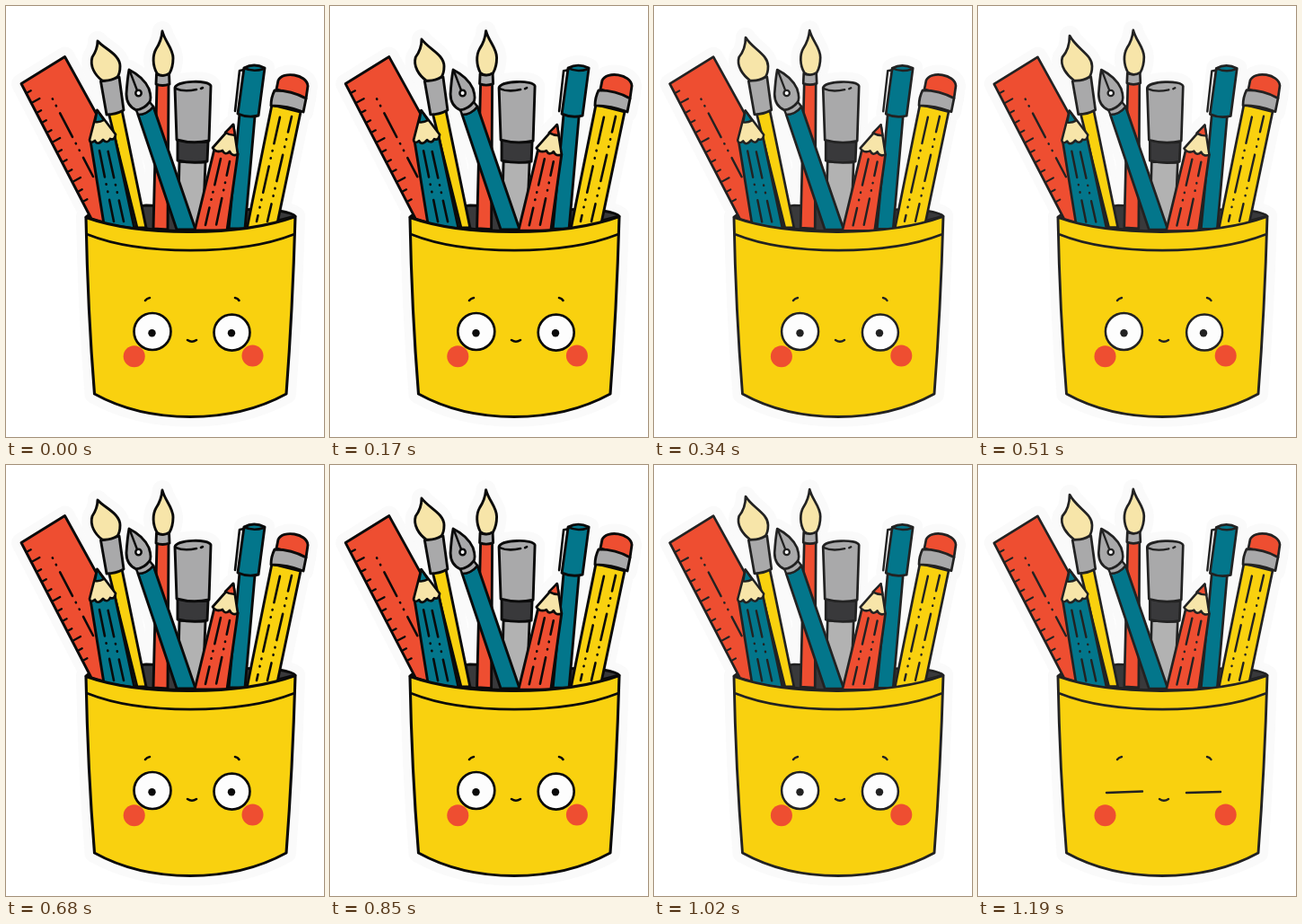
Write an HTML page with a canvas that moves like this. It is 354x480 px and loops after 1.36 s.

```html
<!DOCTYPE html>
<html lang="en">
<head>
<meta charset="utf-8">
<title>Pencil cup</title>
<style>
html, body { margin: 0; width: 100%; height: 100%; overflow: hidden; background: #fff; }
canvas { display: block; width: 354px; height: 480px; }
</style>
</head>
<body>
<canvas id="stage" width="354" height="480"></canvas>
<script>
const ctx = document.getElementById('stage').getContext('2d');
const STEP = 170, POSES = 4, STEPS = 2 * POSES;
const YELLOW = '#f9d10f', RED = '#ee4e31', TEAL = '#03768b';
const GREY = '#a9a9aa', CREAM = '#f7e5a9', DARK = '#39393b', HALO = '#fafafa';
const DASH = [30, 8, .5, 8, .5, 9];
let halo = false, pose = 0, ink, weight;

function shape(d, fill, width = 2.7) {
  const path = new Path2D(d);
  ctx.fillStyle = halo ? HALO : fill;
  ctx.strokeStyle = halo ? HALO : ink;
  ctx.lineWidth = halo ? 22 : width * weight;
  ctx.fill(path);
  ctx.stroke(path);
}

function line(d, width = 2.4) {
  if (halo) return;
  ctx.strokeStyle = ink;
  ctx.lineWidth = width * weight;
  ctx.stroke(new Path2D(d));
}

function dashes(d, offset) {
  ctx.setLineDash(DASH);
  ctx.lineDashOffset = offset;
  line(d);
  ctx.setLineDash([]);
}

function disc(x, y, r, fill, width = 0) {
  if (halo) return;
  ctx.beginPath();
  ctx.arc(x, y, r, 0, Math.PI * 2);
  ctx.fillStyle = fill;
  ctx.fill();
  if (!width) return;
  ctx.lineWidth = width * weight;
  ctx.strokeStyle = ink;
  ctx.stroke();
}

// Each redrawn pose moves a part a little further.
function drift(dx, dy, draw) {
  ctx.save();
  ctx.translate(dx * pose, dy * pose);
  draw();
  ctx.restore();
}

function ruler() {
  shape('M17 86.5L65.5 56.5L111 139L122 245L95 237Z', RED);
  for (let i = 1; i < 13; i++) {
    const y = 86 + i * 11, x = 17 + i * 5.7;
    const size = i % 4 === 2 ? 9 : 5;
    line(`M${x} ${y}l${size} ${-size * .55}`, 2.1);
  }
  dashes('M49 98L97 190', -24);
}

function roundBrush() {
  shape('M114 118L129 116L156 247L146 247Z', YELLOW);
  shape('M105.5 84L126 79L131 116Q122 121 112 121Z', GREY);
}

function roundBristles() {
  const tip = 39 - pose * 2, left = 96 - pose * .7;
  shape(`M102 ${tip}C110 48 127 54 127 67Q127 75 124 79Q116 84 107 83C99 77 ${left - 3} 67 ${left} 57Q102 48 102 ${tip}Z`, CREAM);
}

function thinBrush() {
  shape('M168 87L181 87L180 249L164 248Z', RED);
  shape('M167.5 76Q174 79 181.5 75L182 87Q174 90 167 87Z', GREY);
  shape('M174 28C177 40 186 47 186 58Q186 68 182 75Q174 80 168 75C163 66 163 55 167 48Q173 39 174 28Z', CREAM);
}

function marker() {
  shape('M193 173L222 174L219 249L191 249Z', '#b2b2b2');
  shape('M191 149Q208 153 225 151L224 173Q208 176 191 172Z', DARK);
  shape('M188 91C190 83 226 82 228 89L226 150Q208 154 190 149Z', GREY);
  line('M189 92Q198 96 212 93M217 92L219 91');
}

function pen() {
  shape('M260 120L277 123L266 248L248 248Z', TEAL);
  shape('M265 69Q276 63 288 69L281 122Q269 125 258 120Z', TEAL);
  line('M265 71L260 72L255 117');
  line('M265 69Q275 74 287 70');
}

function nibPen() {
  shape('M147 121Q157 120 164 112L211 249L190 249Z', TEAL);
  shape('M137 71Q153 79 159 92Q163 104 159 108Q153 115 145 116Q134 111 134 98Q135 82 137 71Z', GREY);
  shape('M145 116Q154 115 160 107L164 112Q157 121 147 121Z', GREY, 2.3);
  line('M138 73L146 94', 2.2);
  disc(147.5, 97, 3.2, '#fff', 2.3);
}

function eraserPencil() {
  shape('M296 110L328 118L302 242L268 249Z', YELLOW);
  shape('M301 93L303 83C308 72 335 76 336 89L334 103Z', RED);
  shape('M299 94Q318 94 334 103L331 118Q313 111 295 111Q295 102 299 94Z', GREY);
  dashes('M306 119L279 240', -5);
  dashes('M318 123L291 240', 12);
}

function tealPencil() {
  shape('M94 150L121 145L143 248L109 243Z', TEAL);
  shape('M101.5 116L122 143Q121 150 116 148Q113 154 108 149Q102 156 99 150Q94 154 93 149Z', CREAM, 2.5);
  shape('M101.5 116L109 127Q104 130 99 129Z', TEAL, 2.4);
  dashes('M104 161L120 240', 0);
  dashes('M113 159L131 240', -3);
}

function redPencil() {
  shape('M232 159L258 165L246 250L210 250Z', RED);
  shape('M253 132L258 165Q252 168 249 162Q244 167 241 161Q234 164 230 158Z', CREAM, 2.5);
  shape('M253 132L255 144Q249 144 244 141Z', RED, 2.4);
  dashes('M239 170L222 244', 0);
  dashes('M249 173L234 244', 14);
}

function cupBack() {
  shape('M89 235Q94 230 106 229L156 222L304 228Q320 231 322 234Q205 267 89 235Z', DARK);
}

function cupFront() {
  shape('M89 235.5C150 257 260 257 322 234.5Q319 340 312 432C250 466 160 466 98.5 432Q91 340 89 235.5Z', YELLOW, 2.9);
  line('M91 254.5C150 278 260 278 320 254.5', 2.6);
}

function face(closed) {
  const spread = pose * .4;
  disc(142.7 - spread, 390.3, 12, RED);
  disc(274.5 + spread, 389.5, 12, RED);
  line('M155 328Q157 325.5 160 325M255 325Q258 325.5 259.5 328');
  line('M202 372Q207 375.5 212 372');
  if (closed) {
    line('M143 365L183 363.5M232 365L270 364');
    return;
  }
  disc(163 - spread * .5, 362.5, 20.5, '#fdfdfd', 2.5);
  disc(251.5 + spread * .5, 363.6, 20, '#fdfdfd', 2.5);
  disc(162.5, 364.3, 4.2, ink);
  disc(251, 364.3, 4.2, ink);
}

function drawParts() {
  cupBack();
  drift(.3, .1, ruler);
  drift(-.1, -.1, roundBrush);
  roundBristles();
  drift(-.4, -.4, thinBrush);
  drift(.1, .1, marker);
  drift(.1, .15, pen);
  drift(.1, 0, nibPen);
  drift(0, -.1, eraserPencil);
  drift(.1, .2, tealPencil);
  drift(-.2, .2, redPencil);
  cupFront();
}

function render(time) {
  const step = Math.floor(time / STEP) % STEPS;
  pose = step % POSES;
  const bold = pose < POSES / 2;
  ink = bold ? '#0a0a0a' : '#222222';
  weight = bold ? 1.08 : 1;
  ctx.fillStyle = '#fff';
  ctx.fillRect(0, 0, 354, 480);
  ctx.lineJoin = ctx.lineCap = 'round';
  halo = true;
  drawParts();
  halo = false;
  drawParts();
  face(step === STEPS - 1);
}

let start;
function tick(now) {
  start ??= now;
  render(Math.max(0, now - start));
  requestAnimationFrame(tick);
}
render(0);
requestAnimationFrame(tick);
</script>
</body>
</html>
```
